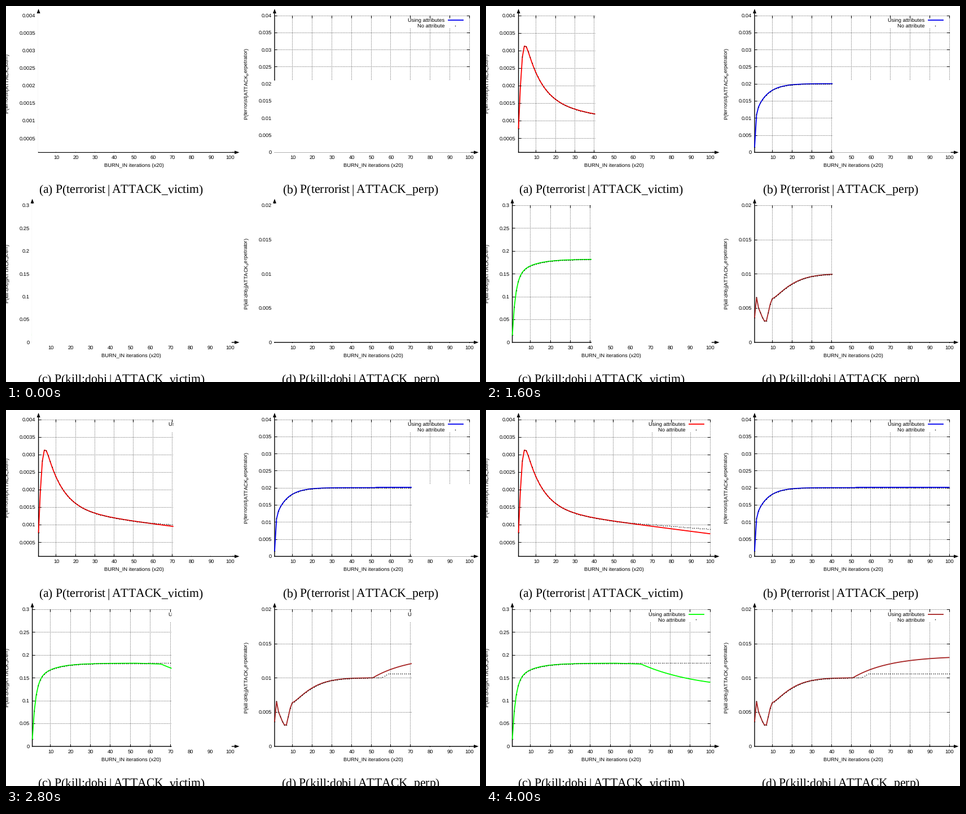
Recreate the animation shown at these times as a matplotlib script. Size 840x666 px, loop 4.2 s.

```python
import numpy as np
import matplotlib.pyplot as plt
from matplotlib.animation import FuncAnimation
from matplotlib.patches import Polygon, Rectangle

W, H, DPI = 840, 666, 100
PX = 72 / DPI  # points per pixel
FRAMES, INTERVAL = 21, 200
SMALL = 9.35

plt.rcParams["text.hinting"] = "no_hinting"
fig = plt.figure(figsize=(W / DPI, H / DPI), dpi=DPI, facecolor="white")
ax = fig.add_axes([0, 0, 1, 1])
ax.set(xlim=(0, W), ylim=(H, 0))
ax.axis("off")


def text(x, y, s, size=SMALL, ha="center", font="Liberation Sans", z=8, **kw):
    ax.text(x, y, s, fontsize=size * PX, ha=ha, va="baseline", family=font,
            color="black", zorder=z, **kw)


def line(xs, ys, width=1.0, color="black", z=2, snap=None, **kw):
    artist, = ax.plot(xs, ys, lw=width * PX, color=color, zorder=z, **kw)
    artist.set_snap(snap)


def grid_line(xs, ys):
    line(xs, ys, 1, "#7c7c7c", 1, ls=(0, (1.4, 1.4)), dash_capstyle="butt")


def dots(xs, ys):
    line(xs, ys, 0, z=4, ls="none", marker="s", ms=1.3 * PX, mew=0)


def since(n, start):
    return np.maximum(n - start, 0)


def decay(n, scale):
    return np.exp(-n / scale)


# Each model returns the values with attributes and without.
def terrorist_victim(n):
    rise = 1 - np.exp(-0.2 * n ** 1.8)
    fall = 1.45 - 0.0071 * n + 1.78 * decay(n - 5, 8.5)
    using = rise * fall
    return using / 1000, (using + 0.0028 * since(n, 53)) / 1000


def terrorist_perp(n):
    plain = 20.03 - 9.44 * decay(n - 1, 5.7) - 9.1 * decay(n - 1, 0.48)
    return (plain + 0.1 * (n > 52)) / 1000, plain / 1000


def kill_victim(n):
    plain = 181.3 + 0.01 * n - 43 * decay(n - 1, 8) - 123 * decay(n - 1, 1.6)
    drift = 0.15 * (since(n, 53) - since(n, 65))
    drop = 59 * (1 - decay(since(n, 65.5), 30))
    return (plain - drift - drop) / 1000, plain / 1000


def kill_perp(n):
    dip = np.interp(n, [1, 2, 3, 5, 6, 7, 9, 10],
                    [3.6, 6.55, 5, 3.6, 3.1, 3.1, 5.6, 6.35])
    climb = 10 - 3.65 * np.exp(-(since(n, 10) / 11) ** 1.3)
    shared = np.where(n < 10, dip, climb)
    using = shared + 3.2 * (1 - decay(since(n, 51), 19))
    plain = shared + 0.6 * np.clip((n - 55) / 4, 0, 1)
    return using / 1000, plain / 1000


class Panel:
    """A chart whose plot area is uncovered from left to right."""

    def __init__(self, letter, event, role, model, color, left, right, top,
                 low, high, step, cover_top, cover_bottom):
        self.left, self.right = left, right
        self.top, self.base = top, top + 242.5
        self.low, self.high = low, high
        self.draw_grid(step)
        self.draw_axes()
        self.draw_curves(model, color)
        self.draw_legend(color)
        self.draw_labels(letter, event, role)
        self.cover = Rectangle((0, cover_top), 1, cover_bottom - cover_top,
                               fc="white", lw=0, zorder=5, snap=False)
        ax.add_patch(self.cover)

    def x(self, iteration):
        return self.left + (self.right - self.left) * (iteration - 1) / 99

    def y(self, value):
        share = (value - self.low) / (self.high - self.low)
        return self.base - (self.base - self.top) * share

    def draw_grid(self, step):
        for i in range(round(self.high / step) + 1):
            value = i * step
            if value < self.low:
                continue
            y = self.y(value)
            if value > self.low:
                grid_line([self.left, self.right], [y, y])
                line([self.left, self.left + 4], [y, y])
                line([self.right - 4, self.right], [y, y])
            text(self.left - 5, y + 3.3, f"{value:g}", ha="right")
        for iteration in range(10, 101, 10):
            x = self.x(iteration)
            grid_line([x, x], [self.top, self.base])
            line([x, x], [self.top, self.top + 4])
            line([x, x], [self.base - 4, self.base])
            text(x + 1, self.base + 12.2, str(iteration))

    def draw_axes(self):
        x, y = self.left, self.base + 0.3
        tip_x, tip_y = self.right + 17, self.top - 11.5
        line([x, x], [tip_y + 5, y], 1.4, snap=False)
        line([x, tip_x - 4], [y, y], 1.4, snap=False)
        for head in ([(x, tip_y), (x - 3, tip_y + 8), (x + 3, tip_y + 8)],
                     [(tip_x, y), (tip_x - 8.5, y - 3), (tip_x - 8.5, y + 3)]):
            ax.add_patch(Polygon(head, fc="black", lw=0, zorder=6))

    def draw_curves(self, model, color):
        n = np.arange(1, 101)
        using, plain = model(n)
        line(self.x(n), self.y(using), 1.8, color, 3,
             solid_joinstyle="round")
        dots(self.x(n), self.y(plain))

    def draw_legend(self, color):
        x, y = self.right - 43, self.top + 8.7
        ax.add_patch(Rectangle((x - 66, y - 4.7), 100, 18.5, fc="white",
                               lw=0, zorder=1.5))
        text(x, y + 3.4, "Using attributes", ha="right", z=4)
        text(x, y + 12.8, "No attribute", ha="right", z=4)
        line([x + 6, x + 32], [y, y], 1.8, color, 4)
        dots([x + 18.5], [y + 9.4])

    def draw_labels(self, letter, event, role):
        in_left_column = self.left < W / 2
        middle = (self.left + self.right) / 2
        sub = rf"$_{{\mathregular{{{role[0]}}}}}$"
        text(5.5 if in_left_column else 429, self.top + 121.3,
             f"P({event}|ATTACK{sub}{role[1:]})", size=9.25, rotation=90,
             rotation_mode="anchor")
        text(middle + (0 if in_left_column else 2.5), self.base + 26.6,
             "BURN_IN iterations (x20)")
        short = {"perpetrator": "perp"}.get(role, role)
        indent = 2 if event == "terrorist" else 0
        text((55.6 if in_left_column else 487.7) + indent, self.base + 73,
             rf"({letter}) P({event}$\,$|$\,$ATTACK_{short})",
             size=21.8, ha="left", font="Liberation Serif")

    def reveal(self, progress):
        start, end = self.left - 1.4, self.right + 3.2
        edge = start + (end - start) * progress
        self.cover.set_x(edge)
        self.cover.set_width(end - edge)


panels = [
    Panel("a", "terrorist", "victim", terrorist_victim, "#ff0000",
          57.6, 396.6, 16.5, 0.0001, 0.004, 0.0005, 13, 258.6),
    Panel("b", "terrorist", "perpetrator", terrorist_perp, "#0000f0",
          476, 820.5, 16.5, 0, 0.04, 0.005, 132, 259.7),
    Panel("c", "kill:dobj", "victim", kill_victim, "#00ff00",
          46.6, 396.6, 353, 0, 0.3, 0.05, 350, 597),
    Panel("d", "kill:dobj", "perpetrator", kill_perp, "#a52222",
          476, 820.5, 353, 0, 0.02, 0.005, 350, 595),
]


def update(frame):
    for panel in panels:
        panel.reveal(frame / (FRAMES - 1))
    return [panel.cover for panel in panels]


anim = FuncAnimation(fig, update, frames=FRAMES, interval=INTERVAL,
                     init_func=lambda: update(0), repeat=True, repeat_delay=0)
plt.show()
```
